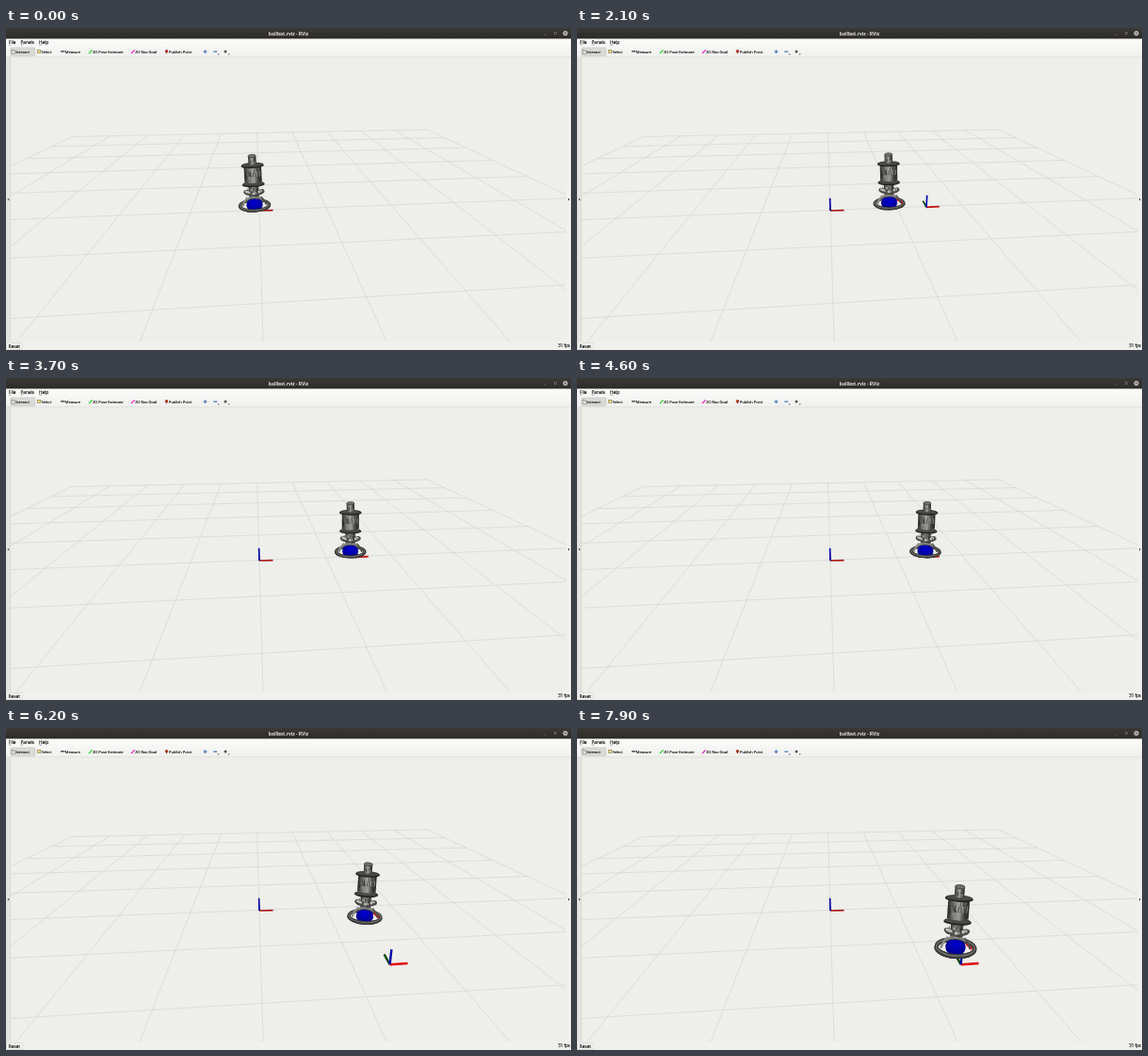
Animation, 600 px wide and 342 px high, one loop 8000 ms. Source, as an HTML page:

```html
<!DOCTYPE html>
<html lang="en">
<head>
<meta charset="utf-8">
<title>ballbot.rviz - RViz</title>
<style>
  html, body { margin: 0; width: 100%; height: 100%; overflow: hidden; background: #f0f0ee; }
  svg { display: block; width: 600px; height: 342px; }
  text { font-family: "Open Sans", "Noto Sans", sans-serif; fill: #0c0c0c; stroke: #0c0c0c; stroke-width: .12; font-size: 4.75px; }
  .title { font-size: 4.95px; font-weight: 700; fill: #e6e4df; stroke: none; }
  .tool text { font-size: 4px; }
  .grid { stroke: #d0d0d3; stroke-width: .6; }
  .axes { fill: none; }
</style>
</head>
<body>
<svg viewBox="0 0 600 342" xmlns="http://www.w3.org/2000/svg">
  <defs>
    <clipPath id="view"><rect x="5" y="31" width="590" height="302"/></clipPath>
    <linearGradient id="bar" x2="0" y2="1">
      <stop offset="0" stop-color="#3b3936"/><stop offset="1" stop-color="#2d2b28"/>
    </linearGradient>
    <linearGradient id="menu" x2="0" y2="1">
      <stop offset="0" stop-color="#fbfbfa"/><stop offset="1" stop-color="#f0f0ee"/>
    </linearGradient>
    <linearGradient id="steel">
      <stop offset="0" stop-color="#2c2c2b"/><stop offset=".3" stop-color="#7e7e7c"/>
      <stop offset=".55" stop-color="#9a9a97"/><stop offset=".75" stop-color="#4c4c4a"/>
      <stop offset="1" stop-color="#292928"/>
    </linearGradient>
    <radialGradient id="blue" cx=".5" cy=".35">
      <stop offset="0" stop-color="#0000d4"/><stop offset="1" stop-color="#000096"/>
    </radialGradient>
  </defs>

  <rect width="600" height="342" fill="#f0f0ee"/>
  <rect y="11" width="600" height="20" fill="url(#menu)"/>
  <rect width="600" height="11.4" fill="url(#bar)"/>
  <text class="title" x="300" y="7.6" text-anchor="middle">ballbot.rviz - RViz</text>
  <g stroke="#85827c" stroke-width=".5" fill="none">
    <path d="M571 7h2.4"/><rect x="582.4" y="4.6" width="2.2" height="2.2"/>
  </g>
  <circle cx="594" cy="5.6" r="2.6" fill="#bab8b2"/>
  <path d="M593 4.6l2 2m0-2l-2 2" stroke="#302f2c" stroke-width=".6"/>

  <text x="3" y="17">File</text><text x="15.5" y="17">Panels</text><text x="35" y="17">Help</text>
  <path d="M3 18h2.3M15.5 18h2.7M35 18h3.2" stroke="#333" stroke-width=".4"/>

  <g class="tool">
    <rect x="4.8" y="20.8" width="26.2" height="9" rx=".8" fill="#d9d8d6" stroke="#c2c1be" stroke-width=".4"/>
    <path d="M6 23.2h1.2v1h2.6v3H6z" fill="#f4f4f2" stroke="#555" stroke-width=".5"/>
    <rect x="33.6" y="23.2" width="3.2" height="3.4" fill="#e9dc88" stroke="#6e6830" stroke-width=".5"/>
    <path d="M58 24.8h4.6" stroke="#555" stroke-width="1.5"/>
    <path d="M88 27l3.6-3.6" stroke="#22d52a" stroke-width="1.2"/>
    <path d="M133 27l3.6-3.6" stroke="#e81fc6" stroke-width="1.2"/>
    <path d="M170.5 27.6l-1.7-2.8a1.7 1.7 0 1 1 3.4 0z" fill="#a8321f"/>
    <path d="M211.5 23.2v3.8m-1.9-1.9h3.8" stroke="#557fb4" stroke-width="1.4"/>
    <path d="M220.4 25.1h3.8" stroke="#557fb4" stroke-width="1.4"/>
    <circle cx="233" cy="25.1" r="1.5" fill="#555"/>
    <path d="M224.7 27.6h2l-1 1.1zM235.7 27.6h2l-1 1.1z" fill="#333"/>
    <text x="10.5" y="26.6">Interact</text><text x="37.6" y="26.6">Select</text>
    <text x="62.8" y="26.6">Measure</text><text x="92" y="26.6">2D Pose Estimate</text>
    <text x="137" y="26.6">2D Nav Goal</text><text x="173" y="26.6">Publish Point</text>
  </g>

  <rect x="0" y="31" width="5" height="302" fill="#e3e3e0"/>
  <rect x="5" y="31" width="590" height="302" fill="#eeeeea"/>
  <path d="M0 30.8h600M4.7 31v302" stroke="#d3d3cf" stroke-width=".5"/>
  <path d="M3.2 180.7v2.8l-1.8-1.4zM597 180.7v2.8l1.8-1.4z" fill="#444"/>

  <g clip-path="url(#view)">
    <g id="grid" class="grid"></g>
    <g id="world" class="axes"></g>
    <g id="goalA" class="axes"></g>
    <g id="goalB" class="axes"></g>
    <g id="robot"></g>
  </g>

  <rect x=".6" y="334.4" width="16.6" height="7.2" rx="1" fill="#f8f8f6" stroke="#bdbcb9" stroke-width=".5"/>
  <text x="2.4" y="340" style="font-size:4.9px">Reset</text>
  <text x="599" y="338.5" text-anchor="end" style="font-size:4.5px">31 fps</text>
</svg>

<script>
const $ = id => document.getElementById(id);

// Ground plane to screen: origin and the two vanishing points.
const ORIGIN = [269, 193.4], FAR_X = [4720, 22], FAR_Y = [264, 22];
function ground(x, y) {
  const u = .0162 * x, v = .183 * y, d = 1 + u + v;
  return ORIGIN.map((o, i) => ((o + u * FAR_X[i] + v * FAR_Y[i]) / d).toFixed(2));
}
function gridLine(a, b) {
  const [x1, y1] = ground(...a), [x2, y2] = ground(...b);
  return `<line x1="${x1}" y1="${y1}" x2="${x2}" y2="${y2}"/>`;
}
let lines = '';
for (let i = -5; i <= 5; i++) {
  lines += gridLine([i, -4], [i, 5]);
  if (i > -4) lines += gridLine([-5, i], [5, i]);
}
$('grid').innerHTML = lines;

function axes(id, x, y, width, blue, green, red, redColor) {
  const arm = (to, color) =>
    `<path d="M${x} ${y}l${to}" stroke="${color}" stroke-width="${width}"/>`;
  $(id).innerHTML = arm(green, '#08480c') + arm(red, redColor) + arm(blue, '#0606a8');
}
axes('world', 269, 194, 1.7, '-.4 -13.2', '0 -4', '14.5 -.3', '#a81414');
axes('goalA', 371, 190.4, 1.7, '.7 -12.7', '-3.6 -6.8', '13.8 -.8', '#c01010');
axes('goalB', 407.6, 251.2, 2.4, '1.8 -16', '-6 -10.8', '19 -1.2', '#e00808');

// Robot, drawn around the centre of its base ring.
const ellipse = (x, y, rx, ry, fill, extra = '') =>
  `<ellipse cx="${x}" cy="${y}" rx="${rx}" ry="${ry}" fill="${fill}" ${extra}/>`;
const stroke = (d, color, width) =>
  `<path d="${d}" fill="none" stroke="${color}" stroke-width="${width}"/>`;
const disc = (y, rx, ry) =>
  ellipse(0, y + .7, rx, ry, '#222221') +
  ellipse(0, y, rx - .6, ry - .6, '#4a4a48', 'stroke="#2e2e2d" stroke-width=".7"');
const tube = (top, bottom, r) =>
  `<path d="M${-r} ${top}V${bottom}Q0 ${bottom + 3} ${r} ${bottom}V${top}z" fill="url(#steel)"/>`;
const motor = (x, y, tilt) => `<g transform="translate(${x} ${y}) rotate(${tilt})">
  ${ellipse(0, 0, 4.6, 2.7, '#4a4a48')}${ellipse(-.4, -.6, 3, 1.4, '#bcbcb9')}</g>`;

let seed = 7;
const rand = () => (seed = seed * 16807 % 2147483647) / 2147483647;
function streaks(n, x, y, w, h, length) {
  let out = '';
  for (let i = 0; i < n; i++) {
    const shade = ['#20201f', '#b4b4b1', '#3c3c3a'][i % 3];
    out += `<rect x="${(x + rand() * w).toFixed(1)}" y="${(y + rand() * h).toFixed(1)}"
      width=".9" height="${(1 + rand() * length).toFixed(1)}" fill="${shade}" opacity=".65"/>`;
  }
  return out;
}

$('robot').innerHTML = `
  <g class="ring">${ellipse(0, .4, 15.5, 5.7, 'none', 'stroke="#3a3a39" stroke-width="3.3"')}
    ${ellipse(0, .1, 15.5, 5.7, 'none', 'stroke="#777775" stroke-width=".9"')}</g>
  <path class="nose" d="M9 -4L14 .6" stroke="#e01010" stroke-width="2.2"/>
  ${stroke('M-12.5 1.5Q-11.5 -4 -7 -8.5', '#8d8d8a', 2)}
  ${stroke('M12.5 .5Q11.5 -4 7 -8.5', '#50504e', 1.7)}
  ${ellipse(0, -.2, 8.7, 7.3, 'url(#blue)')}
  <g class="ring">${stroke('M-15.5 .4A15.5 5.7 0 0 0 15.5 .4', '#3a3a39', 3.3)}
    ${stroke('M-15.5 .1A15.5 5.7 0 0 0 15.5 .1', '#777775', .9)}</g>
  <path d="M-8.6 -4.6Q-7 -8.6 -3.6 -10.5H3.6Q7 -8.6 8.6 -4.6Q4.5 -6.8 0 -6.8T-8.6 -4.6z" fill="#858582"/>
  ${stroke('M-8.6 -4.6Q-4.5 -7 0 -7T8.6 -4.6', '#454544', .8)}
  ${tube(-22, -9.5, 5.4)}
  ${motor(-6.6, -13.4, 20)}${motor(6.8, -13.4, -20)}${motor(.4, -11.6, 0)}
  ${streaks(20, -8, -20, 16, 8, 2.5)}
  ${disc(-22.4, 11.9, 2.8)}
  ${tube(-41, -24.5, 9.2)}
  ${streaks(27, -9, -39.5, 17, 9, 6)}
  ${disc(-42.4, 12.1, 2.8)}
  ${tube(-52, -44, 4.2)}
  ${streaks(6, -3.6, -50, 6.4, 3, 3)}
  ${ellipse(0, -52, 4.2, 1.7, '#6e6e6c', 'stroke="#3a3a39" stroke-width=".6"')}`;

// time, base x, base y, sideways offset of the head
const PATH = [
  [0, 264, 188, -3], [250, 259, 188, -1], [500, 256.5, 188, 3], [900, 268, 188, 3],
  [1300, 290, 187.5, 1], [1800, 319, 186.5, 0], [2300, 339, 185.5, -1.5],
  [2700, 353, 185, -2], [3000, 359, 184.6, -2], [3600, 365, 184.2, 0],
  [4600, 370, 184, 2], [5000, 370.3, 184.3, 2.5], [5400, 371.4, 187.5, 3],
  [6200, 381, 200, 4], [7000, 392.5, 216.5, 4], [7200, 395, 220.5, 4.3], [7900, 402, 233, 5]
];

// Cubic Hermite through the steps, for uneven spacing in time.
function pose(t) {
  const last = PATH.length - 1;
  let i = 0;
  while (i < last - 1 && PATH[i + 1][0] <= t) i++;
  const a = PATH[i], b = PATH[i + 1], span = b[0] - a[0];
  const u = Math.min(1, (t - a[0]) / span);
  const slope = (n, k) => {
    const p = PATH[Math.max(0, n - 1)], q = PATH[Math.min(last, n + 1)];
    return (q[k] - p[k]) / (q[0] - p[0]) * span;
  };
  const u2 = u * u, u3 = u2 * u;
  return [1, 2, 3].map(k =>
    (2 * u3 - 3 * u2 + 1) * a[k] + (u3 - 2 * u2 + u) * slope(i, k) +
    (3 * u2 - 2 * u3) * b[k] + (u3 - u2) * slope(i + 1, k));
}

const LOOP = 8000, STEP = 100;
const robot = $('robot'), rings = robot.querySelectorAll('.ring'), nose = robot.querySelector('.nose');
const show = (el, on) => el.setAttribute('visibility', on ? 'visible' : 'hidden');

function draw(t) {
  const [x, y, lean] = pose(t);
  const height = 53 + (y - 184) * .285, scale = height / 54;
  const angle = Math.atan2(lean, height) * 180 / Math.PI;
  robot.setAttribute('transform', `translate(${x} ${y}) rotate(${angle}) scale(${scale})`);
  const rx = 17.2 + (y - 188) * .118, ry = 7.3 + (y - 188) * .09;
  rings.forEach(r => r.setAttribute('transform', `scale(${rx / 17.1 / scale} ${ry / 7.3 / scale})`));
  show(nose, (t >= 900 && t < 2200) || t >= 5300);
  show($('goalA'), t >= 200 && t < 4700);
  show($('goalB'), t >= 4700);
}

const start = performance.now();
function tick() {
  const t = (performance.now() - start) % LOOP;
  draw(Math.floor(t / STEP) * STEP);
  requestAnimationFrame(tick);
}
tick();
</script>
</body>
</html>
```
